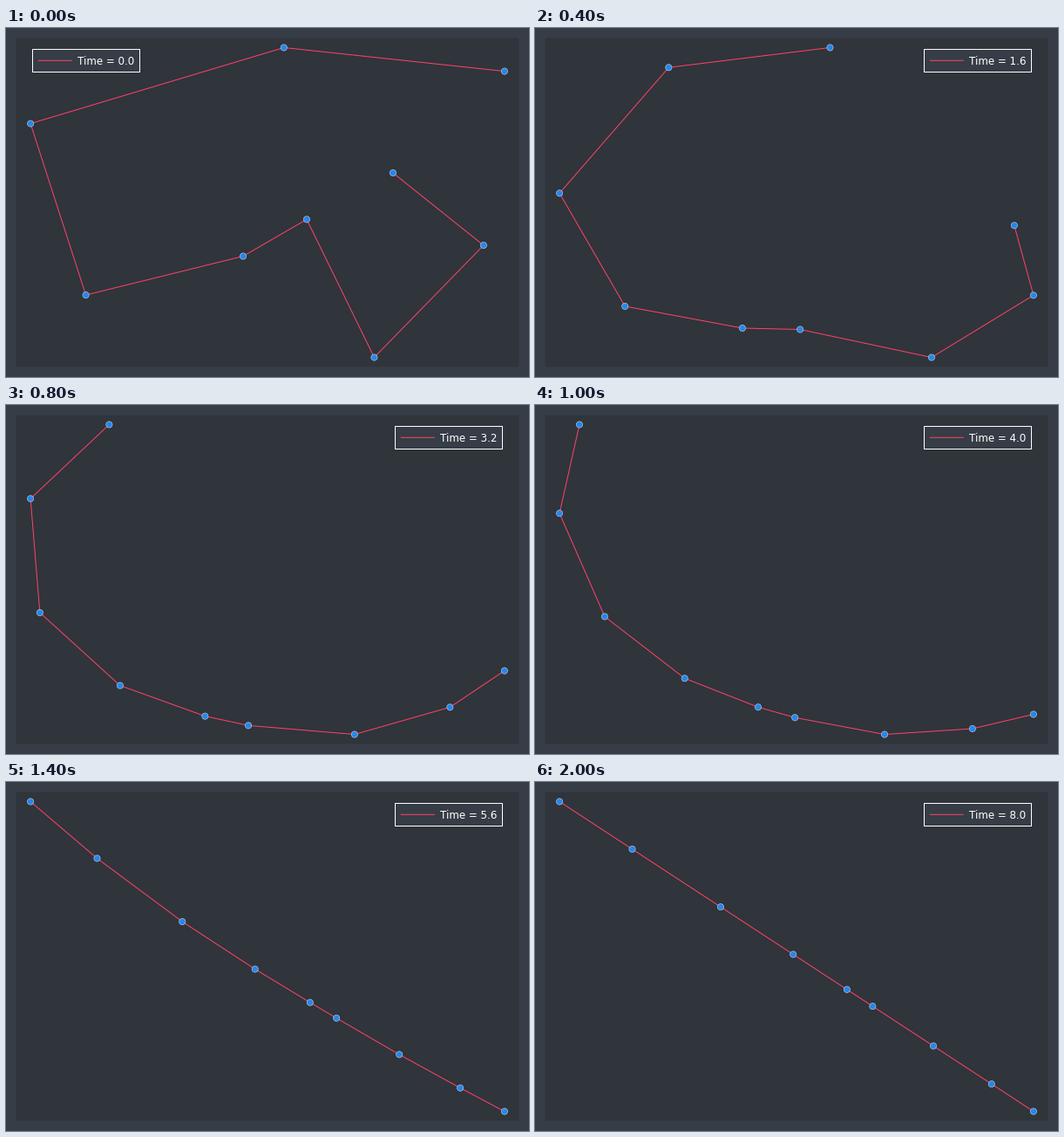
Recreate the animation shown at these times as a matplotlib script. Size 600 by 400 pixels, loop 2.1 s.

```python
import numpy as np
import matplotlib.pyplot as plt
from matplotlib.animation import FuncAnimation
from matplotlib.patches import Circle, Rectangle

W, H, DPI = 600, 400, 100
PX = 72 / DPI  # one pixel in points
FRAMES, INTERVAL, STEP = 21, 100, 0.4
SUBSTEPS = 80

BACK, PANEL, LINE, DOT, RIM = "#363D46", "#30343B", "#FE4365", "#1E90FF", "#A9C4DE"
MARGIN = 11.81
PAD = 0.03 / 1.06

# Starting joints on screen; one pixel of y is worth ASPECT pixels of x.
START = np.array([(572, 49.5), (318.8, 22.4), (28, 109.5), (91.5, 306),
                  (272, 261.5), (345, 219.3), (422.5, 377.5), (548, 249),
                  (444, 166)])
ASPECT = 1.257

links0 = np.diff(START[:, 0] + 1j * ASPECT * START[:, 1])
LENGTH = np.abs(links0)
N = len(START)


def joints_at(angles):
    return np.append(0, np.cumsum(LENGTH * np.exp(1j * angles)))


def torque(angles):
    """Descent direction of sum (|v-a| + |v-b| - |ab|)^-2 over joints v, links ab."""
    p = joints_at(angles)
    gap = p[:, None] - p
    dist = np.abs(gap)
    unit = gap / (dist + np.eye(N))

    reach = dist[:, :-1] + dist[:, 1:] - LENGTH
    k = np.arange(N - 1)
    reach[k, k] = reach[k + 1, k] = np.inf  # a link does not push its own ends
    push = reach ** -3.0

    pair = np.zeros((N, N))
    pair[:, :-1] += push
    pair[:, 1:] += push
    force = ((pair + pair.T) * unit).sum(axis=1)
    tail = np.cumsum(force[:0:-1])[::-1]
    return np.real(np.conj(1j * np.diff(p)) * tail)


def unfold():
    """Straighten the chain at a constant angular speed of one radian per unit time."""
    angles = np.angle(links0)
    poses = [angles.copy()]
    for _ in range(FRAMES - 1):
        for _ in range(SUBSTEPS):
            turn = torque(angles)
            angles += STEP / SUBSTEPS * turn / np.linalg.norm(turn)
        poses.append(angles.copy())
    return poses


def fit(v, size):
    """Scale values to the padded span of the panel."""
    low = MARGIN + PAD * (size - 2 * MARGIN)
    return low + (v - v.min()) / np.ptp(v) * (size - 2 * low)


poses = unfold()

fig = plt.figure(figsize=(W / DPI, H / DPI), dpi=DPI, facecolor=BACK)
ax = fig.add_axes([0, 0, 1, 1])
ax.set_xlim(0, W)
ax.set_ylim(H, 0)
ax.axis("off")

ax.add_patch(Rectangle((MARGIN, MARGIN), W - 2 * MARGIN, H - 2 * MARGIN,
                       fc=PANEL, lw=0, snap=False))
chain, = ax.plot([], [], color=LINE, lw=PX, snap=False, zorder=2)
dots = [ax.add_patch(Circle((0, 0), 3.6, fc=(DOT, 0.9), ec=RIM, lw=0.7 * PX, zorder=3))
        for _ in range(N)]

box = ax.add_patch(Rectangle((0, 24.5), 123, 26, fc=BACK, ec="white", lw=PX,
                             snap=False, zorder=4))
sample, = ax.plot([], [], color=LINE, lw=PX, solid_capstyle="butt",
                  snap=False, zorder=5)
label = ax.text(0, 41.8, "", color="white", family="DejaVu Sans",
                size=11.85 * PX, va="baseline", zorder=5)


def draw(i):
    p = joints_at(poses[i])
    x, y = fit(p.real, W), fit(p.imag, H)
    chain.set_data(x, y)
    for dot, center in zip(dots, zip(x, y)):
        dot.set_center(center)

    # The legend avoids the first joint.
    left = 30.5 if x[0] > 440 else 446.5
    box.set_x(left)
    sample.set_data([left + 6.3, left + 45.3], [37.3, 37.3])
    label.set_x(left + 51.7)
    label.set_text(f"Time = {i * STEP:.1f}")
    return chain, *dots, box, sample, label


anim = FuncAnimation(fig, draw, frames=FRAMES, interval=INTERVAL,
                     repeat=True, repeat_delay=0)
plt.show()
```
